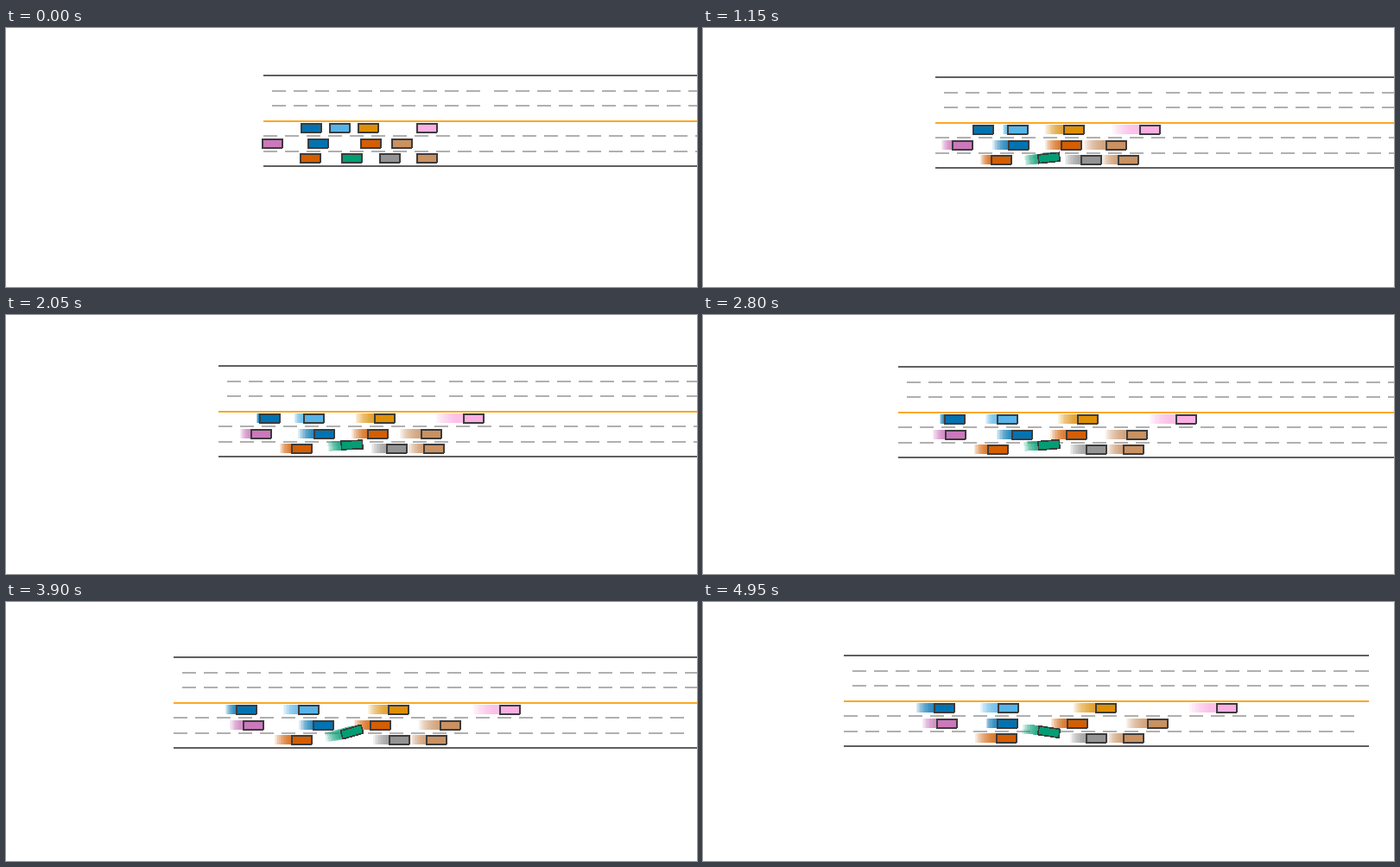
A matplotlib script that plays this animation: 800x300 px, repeating every 5 s.

```python
import numpy as np
import matplotlib.pyplot as plt
from matplotlib.animation import FuncAnimation
from matplotlib.collections import PolyCollection
from matplotlib.colors import to_rgba

W, H = 800, 300
FRAMES, STEP = 100, 50
ROAD = 608           # road length in pixels
TRAIL = 12           # past poses shown behind each car
GHOST_ALPHA = 0.13
LANES = (116, 134, 151)

EDGE, DASH, CENTER = "#606060", "#b0b0b0", "#fca820"
OUTLINE = "#3c3c3c"
BLUE, SKY, GOLD, PINK = "#0173b2", "#56b4e9", "#de8f05", "#fbafe4"
PURPLE, RUST, TAN = "#cc78bc", "#d55e00", "#ca9161"
GREEN, GREY = "#029e73", "#949494"

TIMES = np.arange(FRAMES) * STEP / 1000
END = TIMES[-1]
CRUISE = 29.5        # usual speed in pixels per second


def glide(x0, v0, x1, v1):
    """Move from x0 to x1 with the given start and end speeds."""
    u = TIMES / END
    mean = (x1 - x0) / END
    bend = (v0 - mean) * (1 - u) + (mean - v1) * u
    return x0 + TIMES * (mean + (1 - u) * bend)


def smooth(*points):
    """Cubic Hermite curve through (time, value) points."""
    keys, values = np.array(points, float).T
    slope = np.gradient(values, keys)
    i = np.clip(np.searchsorted(keys, TIMES, side="right") - 1, 0, len(keys) - 2)
    h = keys[i + 1] - keys[i]
    u = (TIMES - keys[i]) / h
    return ((1 + 2 * u) * (1 - u) ** 2 * values[i]
            + u * (1 - u) ** 2 * h * slope[i]
            + u * u * (3 - 2 * u) * values[i + 1]
            + u * u * (u - 1) * h * slope[i + 1])


# Camera: left end of the road, its sideways drift and the green car's heading
road_x = smooth((0, 298), (1.1, 270), (2.8, 226), (3.9, 194), (END, 163))
drift = np.interp(TIMES, [0, 3.3, 3.85, 4.15, 4.4, END],
                  [0, 6, 8.8, 9.9, 9.6, 7.1])
heading = smooth((0, 0), (.7, 8), (1.6, 3), (2.8, 4.8), (3.9, 16),
                 (4.4, -4), (END, -8.5))
ego_x = 388 - road_x

# This car brakes hard when the green one leans into its lane
braking = 51 + 28.6 * TIMES - 15.5 / (1 + np.exp((4.25 - TIMES) / .14))

CARS = [
    (0, BLUE, glide(43, 0, 104, 38)),
    (0, SKY, glide(76, 1, 178, 34)),
    (0, GOLD, glide(109, 34, 291, 42)),
    (0, PINK, glide(177, 52, 431, 51)),
    (1, PURPLE, glide(-2, 17, 107, 27)),
    (1, BLUE, braking),
    (1, RUST, 111.5 + CRUISE * TIMES),
    (1, TAN, glide(148, 44, 351, 41)),
    (2, RUST, glide(42, 19, 176, 42)),
    (2, GREY, 134 + CRUISE * TIMES),
    (2, TAN, 177 + CRUISE * TIMES),
]


def box(x0, y0, x1, y1):
    return np.array([(x0, y0), (x1, y0), (x1, y1), (x0, y1)], float)


def turned(cx, cy, w, h, deg):
    a = np.radians(-deg)
    rot = np.array([[np.cos(a), np.sin(a)], [-np.sin(a), np.cos(a)]])
    return box(-w / 2, -h / 2, w / 2, h / 2) @ rot + (cx, cy)


def road_shapes(x, dy):
    def stripe(a, b, y, color):
        return box(x + a, y + dy - 1, x + b, y + dy + 1), to_rgba(color)

    def dashes(start, count, y):
        for a in range(start, start + 25 * count, 25):
            yield stripe(a, a + 16, y, DASH)

    for y in (73, 90):
        yield from dashes(10, 10, y)
        yield from dashes(267, 14, y)
    for y in (125, 143):
        yield from dashes(0, 24, y)
    for y, color in ((55, EDGE), (160, EDGE), (108, CENTER)):
        yield stripe(0, ROAD, y, color)


def car_shapes(x, cy, color):
    # The outline lacks the pixel at its lower right corner
    body = [(x, cy - 6), (x + 25, cy - 6), (x + 25, cy + 5),
            (x + 24, cy + 5), (x + 24, cy + 6), (x, cy + 6)]
    yield np.array(body, float), to_rgba(OUTLINE)
    yield box(x + 2, cy - 4, x + 23, cy + 4), to_rgba(color)


def ego_shapes(deg):
    if abs(deg) < 2:
        yield from car_shapes(388, 151, GREEN)
    else:
        yield turned(400.5, 150.5, 25, 10.4, deg), to_rgba(OUTLINE)
        yield turned(400.5, 150.5, 21.6, 7, deg), to_rgba(GREEN)


def scene(n):
    dy = int(np.floor(drift[n] + .5))
    yield from road_shapes(round(road_x[n]), dy)
    past = range(max(0, n - TRAIL), n)
    for lane, color, xs in CARS:
        cy = LANES[lane] + dy
        for k in past:
            x = round(xs[k] + road_x[n])
            yield box(x, cy - 6, x + 25, cy + 5), to_rgba(color, GHOST_ALPHA)
    for k in past:
        cx = round(ego_x[k] + road_x[n]) + 12.5
        cy = 150.5 + drift[n] - drift[k]
        yield turned(cx, cy, 25, 10, heading[k]), to_rgba(GREEN, GHOST_ALPHA)
    for lane, color, xs in CARS:
        yield from car_shapes(round(xs[n] + road_x[n]), LANES[lane] + dy, color)
    yield from ego_shapes(heading[n])


fig = plt.figure(figsize=(W / 100, H / 100), dpi=100, facecolor="white")
ax = fig.add_axes([0, 0, 1, 1])
ax.set_xlim(0, W)
ax.set_ylim(H, 0)
ax.axis("off")
shapes = PolyCollection([], linewidths=0, edgecolors="none", antialiaseds=False)
ax.add_collection(shapes, autolim=False)


def draw(n):
    verts, colors = zip(*scene(n))
    shapes.set_verts(verts)
    shapes.set_facecolor(colors)
    return [shapes]


anim = FuncAnimation(fig, draw, frames=FRAMES, interval=STEP,
                     repeat=True, repeat_delay=0, blit=False)
plt.show()
```
